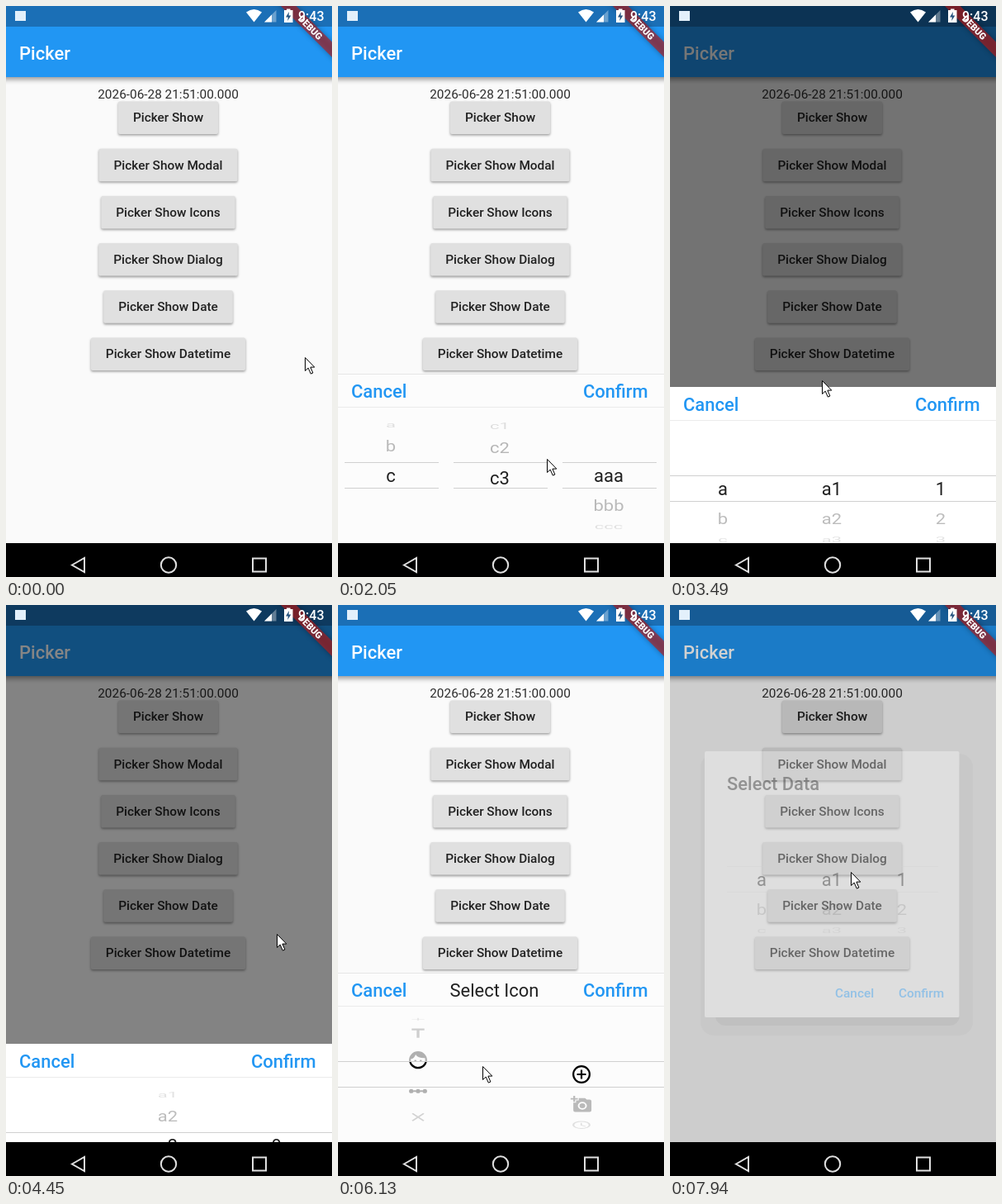
An HTML page with a canvas that plays this animation: 395x691 px, repeating every 8000 ms.

```html
<!DOCTYPE html>
<html lang="en">
<head>
<meta charset="utf-8">
<title>Picker</title>
<style>
html, body { margin: 0; width: 100%; height: 100%; overflow: hidden; background: #fafafa; }
canvas { display: block; }
</style>
</head>
<body>
<canvas id="stage" width="395" height="691"></canvas>
<script>
const W = 395, H = 691, NAV = 650, BLUE = '#2196f3', INK = '#212121';
const LOOP = 8000, STEP = 120, DIALOG = 7940;
const SMALL = 15.36, LARGE = 21.94;
const c = document.getElementById('stage').getContext('2d');

// Runs of steps: [start, last change]
const runs = [[0, 600], [850, 5170], [5410, 7570], [DIALOG, DIALOG]];

// Pointer journey: rests on a control, or drags a wheel upwards
const rest = (t, x, y, wait = 0) => [[t, x, y], [t + wait, x, y]];
const drag = (t, x) => [[t, x, 605], [t + 240, x, 535]];
const journey = [
  rest(0, 362, 425), rest(600, 185, 142, 250),
  drag(1210, 70), drag(1690, 195), rest(2050, 253, 548), rest(2410, 338, 474, 120),
  rest(3250, 195, 198), rest(3490, 184, 453), drag(3670, 195),
  rest(4210, 335, 468, 120), rest(4450, 328, 398), rest(4930, 247, 264), rest(5170, 223, 258, 240),
  drag(5770, 100), rest(6130, 175, 558), drag(6370, 292), rest(6850, 340, 468, 240),
  rest(7570, 219, 323)
].flat();

const clamp = v => Math.max(0, Math.min(1, v));
const ramp = (t, from, to) => 1 - (1 - clamp((t - from) / (to - from))) ** 3;
// Sheet controller: runs up after one tap and back down after another
const shown = (t, up, down) => clamp(Math.min((t - up) / 250, 1 - (t - down) / 250));

function pointerAt(t) {
  const i = journey.findIndex(k => k[0] > t);
  if (i < 0) return journey[journey.length - 1].slice(1);
  const [t0, x0, y0] = journey[i - 1], [t1, x1, y1] = journey[i];
  const f = (t - t0) / (t1 - t0);
  return [x0 + (x1 - x0) * f, y0 + (y1 - y0) * f];
}

const dot = (x, y, r) => `M${x - r} ${y}a${r} ${r} 0 1 0 ${2 * r} 0a${r} ${r} 0 1 0 ${-2 * r} 0z`;
const ring = dot(12, 12, 10) + dot(12, 12, 8);
const paths = list => list.map(d => new Path2D(d));
const mainIcons = paths([
  'M19 13h-6v6h-2v-6H5v-2h6V5h2v6h6z',
  'M5 4v3h5.5v12h3V7H19V4z',
  dot(12, 12, 10) + 'M4 11q4-1 5.3-5.4Q12 10 19.7 9.7A8 8 0 1 1 4 11z' + dot(9, 13, 1.25) + dot(15, 13, 1.25),
  [4.5, 12, 19.5].map(x => dot(x, 12, 2.5)).join('') + 'M7 11h2.5v2H7zm7.5 0H17v2h-2.5z',
  'M19 6.4 17.6 5 12 10.6 6.4 5 5 6.4l5.6 5.6L5 17.6 6.4 19l5.6-5.6 5.6 5.6 1.4-1.4-5.6-5.6z'
]);
const addIcons = paths([
  'M22 3H7L0 12l7 9h15q2 0 2-2V5q0-2-2-2z' + [9, 14, 19].map(x => dot(x, 12, 1.5)).join(''),
  'M3 3h18v18H3zM5 5h14v14H5z',
  dot(12, 12, 8)
]);
const faceIcons = paths([
  ring + 'M13 7h-2v4H7v2h4v4h2v-4h4v-2h-4z',
  'M3 4V1h2v3h3v2H5v3H3V6H0V4zM6 10V7h3V4h7l1.8 2H21q2 0 2 2v12q0 2-2 2H5q-2 0-2-2V10z' + dot(13, 14, 5) + dot(13, 14, 3.2),
  ring + 'M12.5 7H11v6l5.2 3.2.8-1.2-4.5-2.7z'
]);

const buttons = ['', ' Modal', ' Icons', ' Dialog', ' Date', ' Datetime'];
const letters = ['a', 'b', 'c'];
const numbered = s => [1, 2, 3].map(n => s + n);
const counted = from => [0, 1, 2, 3].map(n => String(from + n));

function text(s, x, y, size, { weight = 400, color = INK, align = 'left' } = {}) {
  c.font = `${weight} ${size}px Roboto, sans-serif`;
  c.fillStyle = color;
  c.textAlign = align;
  c.fillText(s, x, Math.round(y + size * .355));
}
function rect(x, y, w, h, color) {
  c.fillStyle = color;
  c.fillRect(x, y, w, h);
}
function poly(points, fill, stroke, width = 1) {
  c.beginPath();
  points.forEach(([x, y]) => c.lineTo(x, y));
  c.closePath();
  if (fill) { c.fillStyle = fill; c.fill(); }
  if (stroke) { c.strokeStyle = stroke; c.lineWidth = width; c.stroke(); }
}
function round(x, y, w, h, r, color) {
  c.beginPath();
  c.roundRect(x, y, w, h, r);
  c.fillStyle = color;
  c.fill();
}
function shadow(alpha, blur, dy, draw) {
  c.save();
  c.shadowColor = `rgba(0,0,0,${alpha})`;
  c.shadowBlur = blur;
  c.shadowOffsetY = dy;
  draw();
  c.restore();
}

function page() {
  rect(0, 0, W, H, '#fafafa');
  shadow(.4, 6, 3, () => rect(-10, 0, W + 20, 86, BLUE));
  rect(0, 0, W, 25, '#1b6fb6');
  text('Picker', 16, 57, LARGE, { weight: 500, color: '#fff' });
  text('2026-06-28 21:51:00.000', 196.5, 106.5, SMALL, { align: 'center', color: '#2c2c2c' });
  buttons.forEach((name, i) => {
    const y = 115.5 + i * 57.2, label = 'Picker Show' + name;
    c.font = `500 ${SMALL}px Roboto, sans-serif`;
    const w = c.measureText(label).width + 36;
    shadow(.38, 3, 1.6, () => round(196.5 - w / 2, y, w, 39.5, 2, '#e0e0e0'));
    text(label, 196.5, y + 19.5, SMALL, { weight: 500, align: 'center' });
  });
}

// One pass over a rolling drum of words or icons
function drum(x, cy, items, pos, selected) {
  items.forEach((item, i) => {
    const angle = (i - pos) * .56;
    if (Math.abs(angle) > 1.4) return;
    const dy = 68 * Math.sin(angle);
    c.save();
    c.globalAlpha *= selected ? 1 : .3 * clamp(1 - (Math.abs(dy) - 30) / 50);
    c.translate(x, cy + dy);
    c.scale(1, Math.cos(angle));
    if (item instanceof Path2D) {
      c.scale(1.097, 1.097);
      c.translate(-12, -12);
      c.fillStyle = '#000';
      c.fill(item, 'evenodd');
    } else text(item, 0, 0, LARGE, { align: 'center', color: selected ? INK : '#000' });
    c.restore();
  });
}
// cols: [centre x, items, position]; spans: [x, width] of the marker lines
function wheels(cy, cols, spans) {
  for (const selected of [false, true]) {
    c.save();
    c.beginPath();
    if (selected) c.rect(0, cy - 15, W, 30);
    else { c.rect(0, cy - 82, W, 67); c.rect(0, cy + 15, W, 67); }
    c.clip();
    cols.forEach(([x, items, pos]) => drum(x, cy, items, pos, selected));
    c.restore();
  }
  for (const [x, w] of spans) {
    rect(x, cy - 16, w, 1, '#d0d0d0');
    rect(x, cy + 15, w, 1, '#d0d0d0');
  }
}
function sheet(v, cols, { title, color = '#fcfcfc', edge = '#e6e6e6', spans = [[0, W]] } = {}) {
  if (!v) return;
  const top = Math.round(NAV - 205 * v * (2 - v));
  const blue = { weight: 500, color: BLUE };
  rect(0, top, W, H, color);
  rect(0, top, W, 1, edge);
  rect(0, top + 40, W, 1, '#ebebeb');
  text('Cancel', 16, top + 21, LARGE, blue);
  text('Confirm', 375.5, top + 21, LARGE, { ...blue, align: 'right' });
  if (title) text(title, 189.5, top + 21, LARGE, { align: 'center' });
  wheels(top + 123, cols, spans);
}

function plainSheet(t) {
  const p1 = 2 * ramp(t, 1250, 1690), p2 = 2 * ramp(t, 1700, 2220);
  const row = Math.round(p1), n = Math.round(p2);
  const last = row < 2 ? counted(row * 10 + 1) : letters.map(s => s.repeat(n + 1));
  sheet(shown(t, 800, 2420), [[64, letters, p1], [196, numbered(letters[row]), p2], [328, last, 0]],
    { spans: [8, 140, 272].map(x => [x, 114]) });
}
function iconSheet(t) {
  const p = 2.46 * ramp(t, 5800, 6120) - .46 * ramp(t, 6130, 6400);
  sheet(shown(t, 5350, 6990), [
    [97, mainIcons, p],
    [295, p < 1.5 ? addIcons : faceIcons, ramp(t, 6400, 6760)]
  ], { title: 'Select Icon' });
}
function modalSheet(t) {
  const v = shown(t, 3310, 4288), p = 2 * ramp(t, 3670, 4060);
  rect(0, 0, W, H, `rgba(0,0,0,${.54 * (1 - (1 - v) ** 5)})`);
  sheet(v, [[64, letters, 0], [196, numbered('a'), p], [328, counted(Math.round(p) * 4 + 1), 0]],
    { color: '#fff', edge: '#fff' });
}

function dialog() {
  const x = 42, y = 177, w = 308.5, h = 322, blue = { weight: 500, color: BLUE };
  rect(0, 0, W, H, 'rgba(0,0,0,.18)');
  c.save();
  c.beginPath();
  c.rect(0, 0, W, H);
  c.rect(x, y, w, h);
  c.clip('evenodd');
  round(37, 180, 330, 341, 16, 'rgba(0,0,0,.022)');
  round(55, 186, 296, 323, 12, 'rgba(0,0,0,.04)');
  c.restore();

  c.save();
  c.globalAlpha = .33;
  round(x, y, w, h, 2, '#fff');
  c.globalAlpha = .4;
  text('Select Data', 69, 216, LARGE, { weight: 500 });
  wheels(332, [[111, letters, 0], [196, numbered('a'), 0], [281, counted(1), 0]], [[69, 256]]);
  text('Cancel', 200, 470, SMALL, blue);
  text('Confirm', 277, 470, SMALL, blue);
  c.restore();
}

function banner() {
  c.save();
  c.translate(W, 0);
  c.rotate(Math.PI / 4);
  shadow(.5, 6, 0, () => rect(-70, 30.7, 140, 13.2, 'rgba(183,28,28,.63)'));
  text('DEBUG', 0, 37.3, 11.2, { weight: 900, color: '#fff', align: 'center' });
  c.restore();
}
function systemBars() {
  rect(11, 6, 13, 12, '#e3f0fb');

  c.beginPath();
  c.moveTo(300.5, 19.5);
  c.lineTo(291, 7.5);
  c.quadraticCurveTo(300.5, .5, 310, 7.5);
  c.closePath();
  c.fillStyle = '#fff';
  c.fill();
  poly([[313, 19.5], [327.5, 19.5], [327.5, 5]], 'rgba(255,255,255,.35)');
  poly([[313, 19.5], [322, 19.5], [322, 10.5]], '#fff');

  rect(337, 5, 10.5, 15, '#fff');
  rect(340, 3.5, 4.5, 2, '#fff');
  poly([[343, 7], [339, 13.5], [341.8, 13.5], [341.2, 18], [345.3, 11.5], [342.5, 11.5]], '#24527e');
  text('9:43', 385.5, 12.5, 16, { weight: 500, color: '#fff', align: 'right' });

  rect(0, NAV, W, H - NAV, '#000');
  poly([[80, 676.5], [95, 668], [95, 685]], null, '#e0e0e0', 2);
  c.beginPath();
  c.arc(197, 676.5, 9.2, 0, Math.PI * 2);
  c.stroke();
  c.strokeRect(299, 668.5, 16, 16);
}
function pointer([x, y]) {
  c.save();
  c.translate(Math.round(x) + .5, Math.round(y) + .5);
  poly([[0, 0], [0, 16], [3.7, 12.6], [6.8, 19.6], [9.4, 18.5], [6.4, 11.6], [11.3, 11.6]], '#fff', '#000');
  c.restore();
}

function draw(t) {
  page();
  plainSheet(t);
  iconSheet(t);
  modalSheet(t);
  if (t >= DIALOG) dialog();
  banner();
  systemBars();
  pointer(pointerAt(t));
}

function tick() {
  const now = performance.now() % LOOP;
  const [start, end] = runs.filter(r => r[0] <= now).pop();
  draw(Math.min(end, start + Math.floor((now - start) / STEP) * STEP));
  requestAnimationFrame(tick);
}
tick();
</script>
</body>
</html>
```
